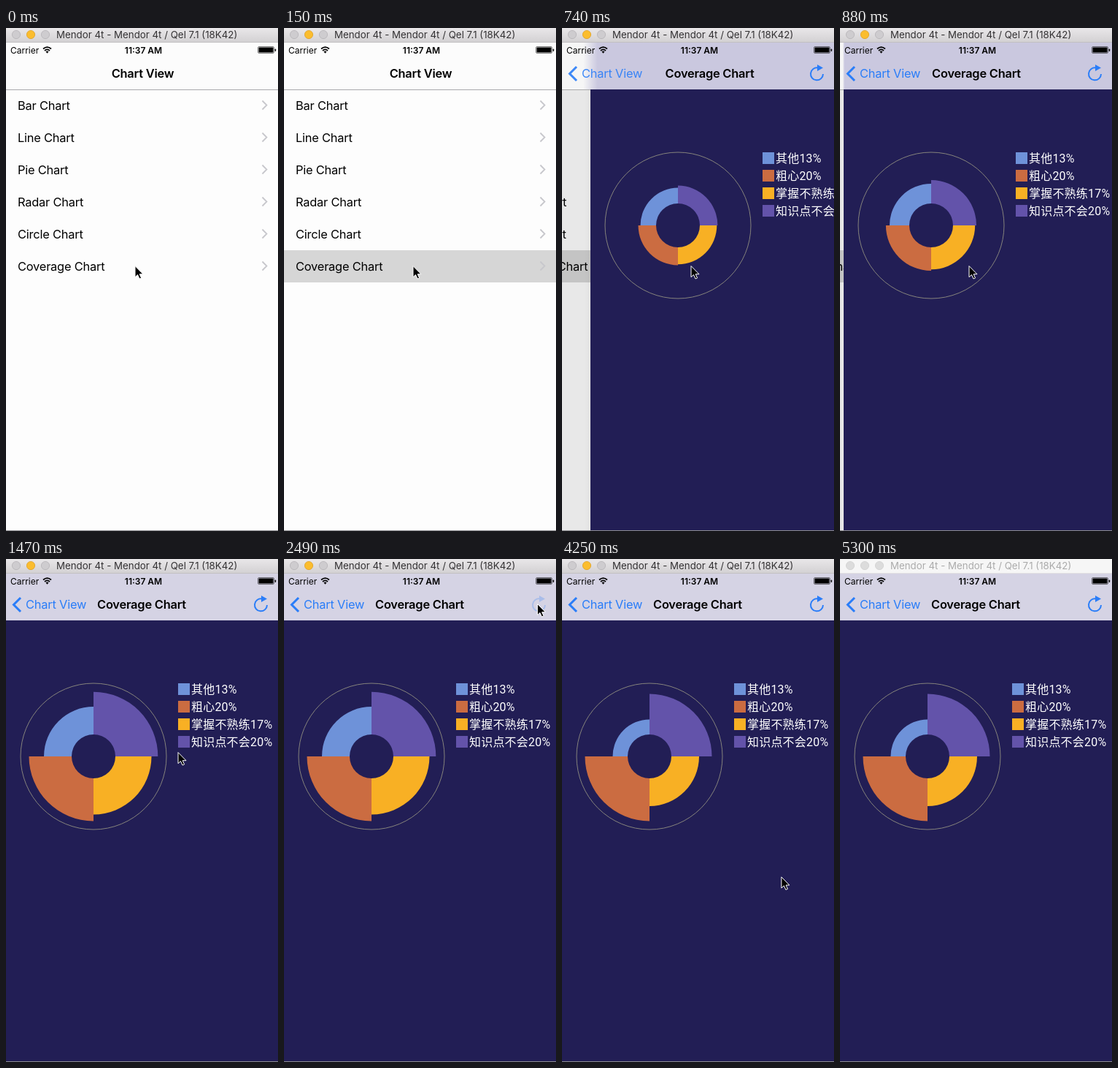
Write an HTML page that moves like this. It is 373 px wide and 688 px high and loops after 5370 ms.

```html
<!DOCTYPE html>
<html lang="zh-CN">
<head>
<meta charset="utf-8">
<title>Chart View</title>
<style>
  html, body { margin: 0; width: 100%; height: 100%; overflow: hidden; background: #fff; }
  svg { display: block; width: 373px; height: 688px; }
  text { font-family: Inter, "Noto Sans", sans-serif; }
  .ui { font-size: 16.4px; letter-spacing: -.2px; }
  .bold { font-weight: 600; }
  .status { font-size: 12px; }
  .bar { font-size: 13.3px; }
  .legend { font-family: Roboto, "Noto Sans CJK SC", "Noto Sans CJK", sans-serif; font-size: 16px; letter-spacing: .2px; fill: #fff; }
  .tint { fill: #2a7df8; }
  .line { fill: none; stroke: #2a7df8; }
</style>
</head>
<body>
<svg viewBox="0 0 373 688" xmlns="http://www.w3.org/2000/svg">
  <defs>
    <linearGradient id="chrome" x2="0" y2="1">
      <stop stop-color="#e9e7e9"/><stop offset="1" stop-color="#d2d0d2"/>
    </linearGradient>
    <linearGradient id="navFill" gradientUnits="userSpaceOnUse" y1="0" y2="0">
      <stop id="navLeft"/><stop id="navRight" offset="1"/>
    </linearGradient>
    <linearGradient id="shade">
      <stop stop-opacity="0"/><stop offset="1" stop-opacity=".22"/>
    </linearGradient>
  </defs>

  <rect width="373" height="688" fill="#fdfdfd"/>
  <g id="list">
    <rect id="selected" y="304" width="485" height="44" fill="#d6d6d6"/>
  </g>
  <rect id="dim" y="84" width="373" height="604"/>
  <rect y="84" width="373" height="1" fill="#a9a9ab"/>

  <g id="page">
    <rect id="edge" x="-9" y="85" width="9" height="603" fill="url(#shade)"/>
    <rect y="84" width="373" height="604" fill="#221e55"/>
    <circle cx="120" cy="270" r="100" fill="none" stroke="#85837c"/>
    <g id="chart" transform="translate(120 270)"></g>
    <g id="legend"></g>
  </g>
  <rect y="687" width="373" height="1" fill="#8c8c90"/>

  <rect y="20" width="373" height="64" fill="url(#navFill)"/>
  <text id="oldTitle" class="ui bold" x="187.5" y="68" text-anchor="middle">Chart View</text>
  <text id="newTitle" class="ui bold" x="125" y="68">Coverage Chart</text>
  <g id="back">
    <path class="line" d="M20 53L10.5 62.5L20 72" stroke-width="3"/>
    <text class="ui tint" x="27" y="68">Chart View</text>
  </g>
  <g id="reload">
    <path class="line" d="M351 54.5A8.5 8.5 0 1 0 358 63" stroke-width="2"/>
    <path class="tint" d="M350 50L358 54.5L350 59Z"/>
  </g>

  <text class="status" x="6" y="34.5">Carrier</text>
  <g fill="none" stroke="#000" stroke-width="1.7">
    <path d="M51 28.5Q56.5 23.7 62 28.5M53 31Q56.5 27.8 60 31"/>
    <path d="M54.5 32.2Q56.5 30.8 58.5 32.2L56.5 34.7Z" fill="#000" stroke="none"/>
  </g>
  <text class="status bold" x="188.5" y="34.5" text-anchor="middle">11:37 AM</text>
  <rect x="345.5" y="25.5" width="22" height="9" rx="1.5" fill="none" stroke="#000" stroke-opacity=".5"/>
  <rect x="346.5" y="26.5" width="20" height="7" rx=".5"/>
  <rect x="368.7" y="28.5" width="1.5" height="3.5" rx=".7"/>

  <rect id="chromeBar" width="373" height="20"/>
  <rect id="chromeLine" y="19" width="373" height="1" fill="#c2c0c2"/>
  <g id="dots">
    <circle cx="14" cy="9" r="5.6"/><circle cx="34" cy="9" r="5.6"/><circle cx="54" cy="9" r="5.6"/>
  </g>
  <text id="barText" class="bar" x="69" y="14">Mendor 4t - Mendor 4t / Qel 7.1 (18K42)</text>

  <path id="cursor" d="M0 0V15.2L3.5 12L6 17.5L8.6 16.4L6.2 11.2H11Z" stroke="#fff" stroke-linejoin="round"/>
</svg>

<script>
const LOOP = 5370;
// The screen is refreshed in coarse steps.
const TICKS = [0, 150, 590, 740, 880, 1030, 1180, 1320, 1470, 1610, 1760, 1910, 2050, 2200, 2350,
  2490, 2640, 2790, 2940, 3080, 3230, 3670, 3820, 3960, 4110, 4260, 4400, 5300];
const PUSH = 530, RELOAD = 2500, LEAVE = 3530, GONE = 4400, INACTIVE = 5300;

const ROWS = ['Bar', 'Line', 'Pie', 'Radar', 'Circle', 'Coverage'];
// Clockwise from the top right: colour, first radius, radius after reload.
const PARTS = [
  ['#6353aa', 88.3, 85.5],
  ['#f8b024', 79.5, 68],
  ['#cb6c41', 88.5, 88.5],
  ['#6e92d9', 68, 50.5]
];
const LEGEND = [[3, '其他13%'], [2, '粗心20%'], [1, '掌握不熟练17%'], [0, '知识点不会20%']];
const POINTER = [[1180, 177, 325.5], [1470, 236, 264.5], [1910, 363, 80], [2200, 347.5, 61.5]];
const HOLE = 30, SEED = 43;

const $ = id => document.getElementById(id);
const clamp = v => Math.max(0, Math.min(1, v));
const set = (id, attrs) => {
  for (const k in attrs) $(id).setAttribute(k, attrs[k]);
};
const add = (parent, tag, attrs, text = '') => {
  const el = document.createElementNS('http://www.w3.org/2000/svg', tag);
  for (const k in attrs) el.setAttribute(k, attrs[k]);
  el.textContent = text;
  return $(parent).appendChild(el);
};

ROWS.forEach((name, i) => {
  const y = 84 + 44 * i;
  add('list', 'text', { class: 'ui', x: 16, y: y + 28 }, name + ' Chart');
  add('list', 'path', { d: `M351.5 ${y + 15.5}l6 6l-6 6`, fill: 'none', stroke: '#c7c7cc', 'stroke-width': 1.8 });
});
LEGEND.forEach(([part, label], i) => {
  const y = 170 + 24 * i;
  add('legend', 'rect', { x: 236, y, width: 16, height: 16, fill: PARTS[part][0] });
  add('legend', 'text', { class: 'legend', x: 254, y: y + 14 }, label);
});
const wedges = PARTS.map(([fill], i) => add('chart', 'path', { fill, transform: `rotate(${90 * i})` }));

const wedge = r => `M0 ${-r}A${r} ${r} 0 0 1 ${r} 0H${HOLE}A${HOLE} ${HOLE} 0 0 0 0 ${-HOLE}Z`;

function radius(part, t) {
  const again = t >= RELOAD;
  const end = part[again ? 2 : 1];
  const span = (370 + 10.2 * (end - SEED)) * (again ? .87 : 1);
  return SEED + (end - SEED) * clamp((t - (again ? RELOAD : PUSH)) / span);
}

// Critically damped spring.
function spring(ms) {
  const x = Math.max(0, ms) * .0182;
  return 1 - (1 + x) * Math.exp(-x);
}

function pointer(t) {
  if (t > LEAVE) {
    const u = clamp((t - LEAVE) / (GONE - LEAVE)), v = 1 - u;
    const curve = (a, b, c) => v * v * a + 2 * u * v * b + u * u * c;
    return [curve(348, 200, 390), curve(62, 300, 663)];
  }
  let i = 0;
  while (i < POINTER.length - 2 && t > POINTER[i + 1][0]) i++;
  const [t0, x0, y0] = POINTER[i], [t1, x1, y1] = POINTER[i + 1];
  const k = clamp((t - t0) / (t1 - t0));
  return [x0 + (x1 - x0) * k, y0 + (y1 - y0) * k];
}

function drawNav(t, p, x) {
  // The blur across the page edge vanishes at both sides of the screen.
  const soft = Math.min(35, x / 4, (373 - x) / 2);
  const k = clamp((t - 880) / 440);
  set('navFill', { x1: x - soft, x2: x + soft });
  set('navLeft', { 'stop-color': p > 0 ? '#f6f6f6' : '#fcfcfc' });
  set('navRight', { 'stop-color': `rgb(${202 + 11 * k},${200 + 11 * k},${223 + 5 * k})` });
  if (soft === 0) set(p > 0 ? 'navLeft' : 'navRight', { 'stop-color': $(p > 0 ? 'navRight' : 'navLeft').getAttribute('stop-color') });

  set('oldTitle', { transform: `translate(${-90 * p})`, opacity: clamp(1 - 1.8 * p) });
  set('newTitle', { transform: `translate(${308 * (1 - p) ** 1.3})`, opacity: clamp((p - .25) / .6) });
  set('back', { opacity: clamp((p - .35) / .6) });
  const pressed = t >= 2400;
  const glow = pressed ? .25 + .75 * clamp((t - 2550) / 470) : clamp(p * 1.2);
  set('reload', { opacity: glow });
}

function drawChrome(active) {
  const dots = active ? ['#cecccf', '#fbbd2e', '#cecccf'] : Array(3).fill('#dcdcdc');
  const rims = active ? ['#b5b3b6', '#dfa023', '#b5b3b6'] : Array(3).fill('#d0d0d0');
  [...$('dots').children].forEach((dot, i) => {
    dot.setAttribute('fill', dots[i]);
    dot.setAttribute('stroke', rims[i]);
    dot.setAttribute('stroke-width', .8);
  });
  set('chromeBar', { fill: active ? 'url(#chrome)' : '#f6f6f6' });
  set('chromeLine', { opacity: active ? 1 : .4 });
  set('barText', { fill: active ? '#343234' : '#ababab' });
}

function draw(t) {
  const p = spring(t - PUSH);
  const x = Math.round(373 * (1 - p));
  set('list', { transform: `translate(${Math.round(-112 * p)})` });
  set('selected', { opacity: t >= 150 ? 1 : 0 });
  set('dim', { opacity: .09 * p });
  set('page', { transform: `translate(${x})` });
  set('edge', { opacity: p > 0 ? 1 - p : 0 });
  wedges.forEach((el, i) => el.setAttribute('d', wedge(radius(PARTS[i], t))));
  drawNav(t, p, x);
  drawChrome(t < INACTIVE);
  const [cx, cy] = pointer(t);
  set('cursor', { transform: `translate(${cx} ${cy})`, opacity: t < GONE ? 1 : 0 });
}

let start, last;
function frame(now) {
  start ??= now;
  const t = (now - start) % LOOP;
  const tick = TICKS.findLast(v => v <= t);
  if (tick !== last) draw(last = tick);
  requestAnimationFrame(frame);
}
draw(0);
requestAnimationFrame(frame);
</script>
</body>
</html>
```
